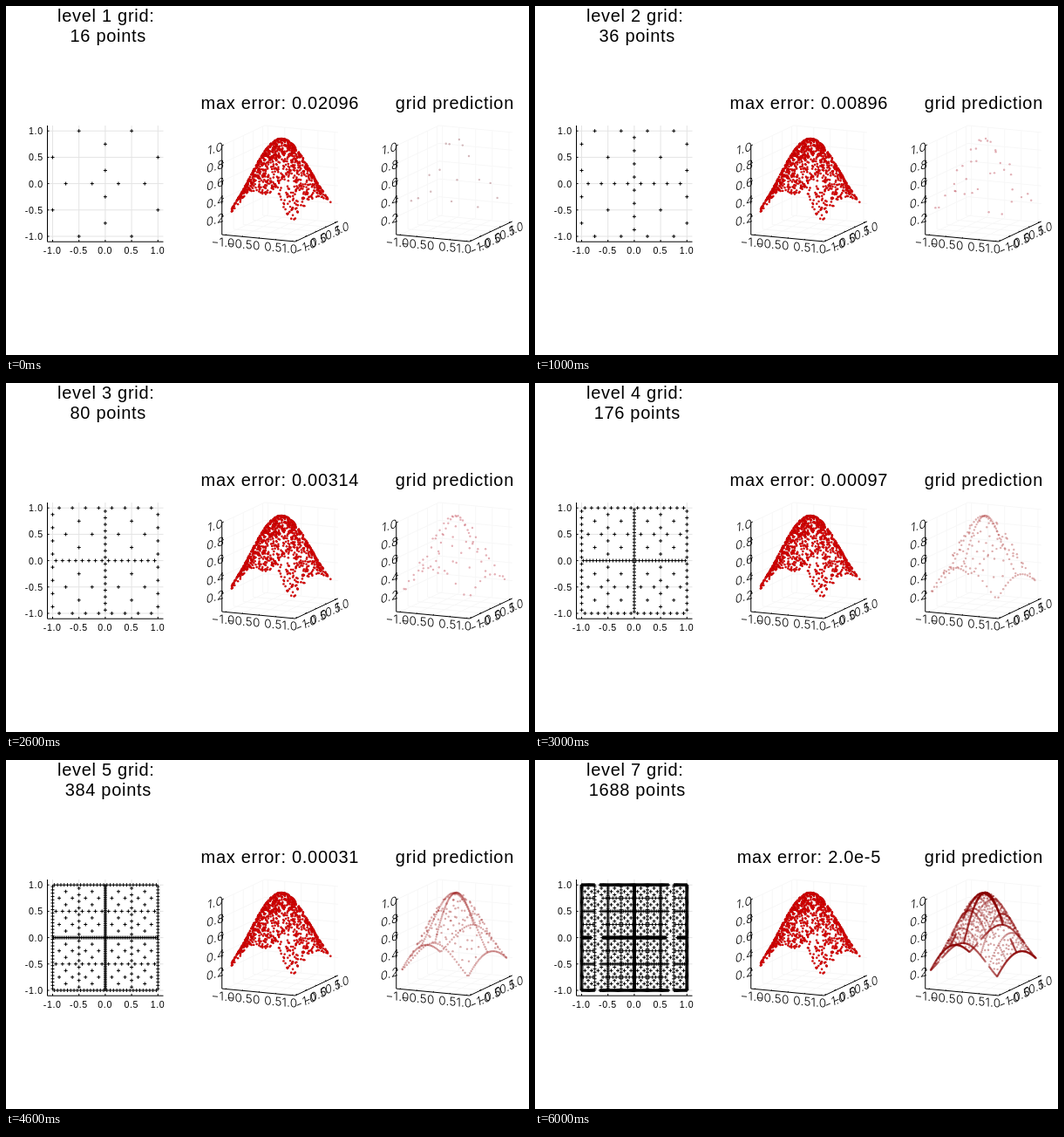
Recreate the animation shown at these times as an HTML page. Size 600 by 400 pixels, loop 7000 ms.

```html
<!DOCTYPE html>
<html lang="en">
<head>
<meta charset="utf-8">
<title>Adaptive sparse grid</title>
<style>
  html, body { margin: 0; width: 100%; height: 100%; overflow: hidden; background: #fff; }
  svg { display: block; width: 600px; height: 400px; }
  text { font-family: "Liberation Sans", Arial, sans-serif; fill: #000; text-anchor: middle; }
  .title { font-size: 20px; letter-spacing: .7px; }
  .tick { font-size: 10.6px; letter-spacing: .65px; }
  .tick3d { font-family: Inter, Roboto, sans-serif; font-weight: 300; font-size: 13.6px; letter-spacing: .3px; }
  .end { text-anchor: end; }
  .axis { stroke: #000; stroke-width: 1; fill: none; }
  .grid { stroke: #e4e4e4; stroke-width: 1; fill: none; }
  .faint { stroke: #f7f7f7; stroke-width: 1; fill: none; }
  .plus { stroke: #000; stroke-width: 1; fill: none; }
</style>
</head>
<body>
<svg id="stage" viewBox="0 0 600 400" xmlns="http://www.w3.org/2000/svg"></svg>
<script>
const STEP = 1000, LEVELS = 7, TOL = 1e-5, LIM = 1.1;
const ERRORS = ["0.02096", "0.00896", "0.00314", "0.00097", "0.00031", "9.0e-5", "2.0e-5"];
const TINTS = ["#8a4048", "#b02434", "#b82838", "#a42020", "#981414", "#8b0000", "#8b0000"];
const TICKS = [-1, -0.5, 0, 0.5, 1];

const stage = document.getElementById("stage");

function add(tag, attrs, parent = stage, content) {
  const node = document.createElementNS("http://www.w3.org/2000/svg", tag);
  for (const key in attrs) node.setAttribute(key, attrs[key]);
  if (content !== undefined) node.textContent = content;
  parent.appendChild(node);
  return node;
}
const line = (a, b) => `M${a[0].toFixed(2)} ${a[1].toFixed(2)}L${b[0].toFixed(2)} ${b[1].toFixed(2)}`;
const path = (cls, d, parent) => add("path", { class: cls, d }, parent);
const text = (cls, x, y, str, parent) => add("text", { class: cls, x, y }, parent, str);

// The surface is a product, so hierarchical surpluses multiply too.
const fx = x => Math.exp(-x * x);
const fy = y => Math.cos(y);
const surface = (x, y) => fx(x) * fy(y);

function surplus(f, p, level) {
  if (level === 0) return f(0);
  if (level === 1) return f(p) - f(0);
  const h = 2 ** (1 - level);
  return f(p) - (f(p - h) + f(p + h)) / 2;
}

function children(p, level) {
  if (level === 0) return [-1, 1];
  if (level === 1) return [p / 2];
  const h = 2 ** -level;
  return [p - h, p + h];
}

function refine(points) {
  const next = new Map();
  const put = (x, i, y, j) => next.set(x + "," + y, { x, i, y, j });
  for (const { x, i, y, j } of points) {
    if (Math.abs(surplus(fx, x, i) * surplus(fy, y, j)) < TOL) continue;
    children(x, i).forEach(c => put(c, i + 1, y, j));
    children(y, j).forEach(c => put(x, i, c, j + 1));
  }
  return [...next.values()];
}

// Flat plot
const px = x => 113.9 + 60.4 * x;
const py = y => 203.6 - 60.4 * y;

function drawFlat() {
  let grid = "", marks = "";
  for (const t of TICKS) {
    grid += line([px(t), 137], [px(t), 270]) + line([47.5, py(t)], [180.5, py(t)]);
    marks += line([px(t), 270], [px(t), 268]) + line([47.5, py(t)], [49.5, py(t)]);
    text("tick", px(t) - 0.3, 284, t.toFixed(1));
    text("tick end", 42.7, py(t) + 4, t.toFixed(1));
  }
  path("grid", grid);
  path("axis", "M47.5 137V270.2H180.5" + marks);
}

// Spatial plot, in the coordinates of the middle panel
const project = (x, y, z) => [
  314.3 + 38.2 * x + 22.3 * y,
  254.5 + 3.6 * x - 10.5 * y - 102 * z
];

function drawSpace(parent) {
  let faint = "", marks = "";
  const label = (m, x, y, str) =>
    add("text", { class: "tick3d", transform: `matrix(${m} ${x} ${y})`, y: 4.8 }, parent, str);
  const name = t => t === 0 ? "0" : t.toFixed(1).replace("-", "\u2212");
  const along = { x: "1 .08 0 1", y: ".86 -.38 .16 1", z: ".98 -.3 -.06 1" };

  for (const t of TICKS) {
    const front = project(t, -LIM, 0), side = project(LIM, t, 0);
    faint += line(front, project(t, LIM, 0)) + line(project(t, LIM, 0), project(t, LIM, 1));
    faint += line(side, project(-LIM, t, 0)) + line(project(-LIM, t, 0), project(-LIM, t, 1));
    marks += line(front, project(t, -LIM + 0.05, 0)) + line(side, project(LIM - 0.04, t, 0));
    label(along.x, front[0] - 2.5, front[1] + 8.4, name(t));
    label(along.y, side[0] + 8.5 - 1.5 * t, side[1] + 6.8, name(t));
  }
  for (let k = 1; k <= 5; k++) {
    const z = k / 5, a = project(-LIM, -LIM, z), b = project(-LIM, LIM, z);
    faint += line(a, b) + line(b, project(LIM, LIM, z));
    marks += line(a, [a[0] + 2, a[1] - 1]);
    label(along.z, a[0] - 7.5, a[1] + 3.2, z.toFixed(1));
  }
  path("faint", faint, parent);
  const low = project(-LIM, -LIM, 0), near = project(LIM, -LIM, 0);
  path("axis", marks + line(project(-LIM, -LIM, 1), low) + line(low, near) +
    line(near, project(LIM, LIM, 0)), parent);
}

function dot(x, y, r, parent) {
  const [u, v] = project(x, y, surface(x, y));
  add("circle", { cx: u.toFixed(2), cy: v.toFixed(2), r }, parent);
}

function drawSamples() {
  const group = add("g", {
    fill: "#dc0000", stroke: "#600000", "stroke-width": 0.3, "stroke-opacity": 0.4
  });
  let seed = 2024;
  const random = () => (seed = (seed * 1664525 + 1013904223) % 4294967296) / 4294967296;
  for (let n = 0; n < 1000; n++) dot(random() * 2 - 1, random() * 2 - 1, 1.2, group);
}

function drawLevel(points, n) {
  const group = add("g", { display: "none" });
  text("title", 114.8, 18, `level ${n + 1} grid:`, group);
  text("title", 117.3, 41, `${points.length} points`, group);
  text("title", 314.4, 118, `max error: ${ERRORS[n]}`, group);
  path("plus", points.map(({ x, y }) =>
    `M${(px(x) - 2).toFixed(2)} ${py(y).toFixed(2)}h4m-2 -2v4`).join(""), group);
  const cloud = add("g", {
    transform: "translate(200 0)", fill: TINTS[n], "fill-opacity": 0.36
  }, group);
  for (const { x, y } of points) dot(x, y, 1.2, cloud);
  return group;
}

drawFlat();
drawSpace(add("g", {}));
drawSpace(add("g", { transform: "translate(200 0)" }));
drawSamples();
text("title", 514.9, 118, "grid prediction");

let points = [{ x: 0, i: 0, y: 0, j: 0 }];
points = refine(refine(points));
const levels = [];
for (let n = 0; n < LEVELS; n++) {
  points = refine(points);
  levels.push(drawLevel(points, n));
}

const start = performance.now();
let shown = -1;

function render(ms) {
  const n = Math.floor(ms / STEP) % LEVELS;
  if (n === shown) return;
  shown = n;
  levels.forEach((g, k) => g.setAttribute("display", k === n ? "inline" : "none"));
}

function tick() {
  render(performance.now() - start);
  requestAnimationFrame(tick);
}
tick();
</script>
</body>
</html>
```
